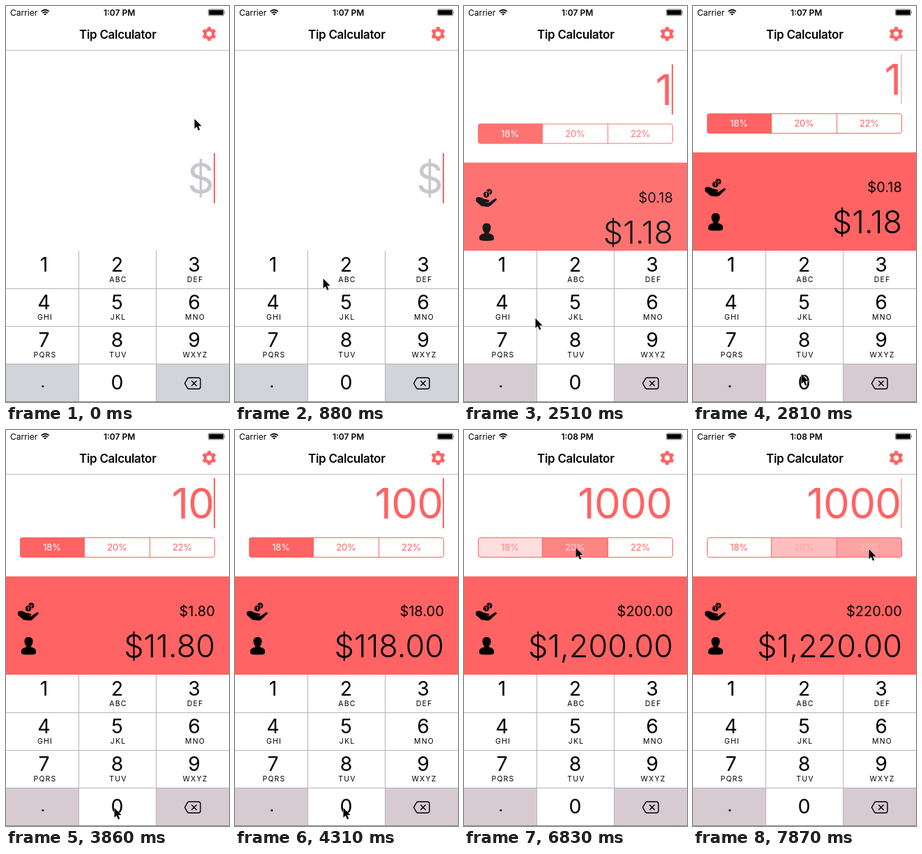
Animation of 320x568 px, one loop 8 s. Source, as an HTML page:

```html
<!DOCTYPE html>
<html lang="en">
<head>
<meta charset="utf-8">
<title>Tip Calculator</title>
<style>
html, body { margin: 0; width: 100%; height: 100%; overflow: hidden; background: #fff; }
svg { display: block; width: 100%; height: 100%; }
text { font-family: Inter, Roboto, sans-serif; }
.end { text-anchor: end; }
.mid { text-anchor: middle; }
#amount, #hint { font-size: 60px; letter-spacing: -.7px; }
#tip { font-size: 20px; }
#total { font-size: 45px; font-weight: 300; }
.digit { font-size: 28.5px; }
.sub { font-size: 10.5px; letter-spacing: 1.2px; }
.seg { font-size: 13px; letter-spacing: -.2px; }
</style>
</head>
<body>
<svg viewBox="0 0 320 568">
  <g id="panel">
    <rect y="210" width="320" height="358" fill="#ff6363"/>
    <path d="M17 261l3-1.5q5-.5 8 2.500l7 1.500q2.500 1 .5 3H30l6 .8 8-5.500q3-1 3 1.500l-9 8.500q-2 1.800-5 1.500l-8-1-8-7z"/>
    <g stroke="#ff6363">
      <circle cx="36.200" cy="252" r="4.700"/>
      <circle cx="32" cy="256" r="4.700"/>
      <path d="M37 250v3M32.300 253.500v5M31 254.500h1.300" fill="none" stroke-width="1.200"/>
    </g>
    <path d="M32.500 297c4.300 0 6.300 3 6 6.800-.2 3-1.500 5-2.700 6.200v1.300c4 1.500 7.200 2.300 7.200 6v2.700q0 2.300-10.500 2.300T22 320v-2.700c0-3.700 3.200-4.500 7.200-6V310c-1.200-1.200-2.500-3.200-2.700-6.200-.3-3.800 1.700-6.800 6-6.800z"/>
    <text id="tip" class="end" x="299.800" y="267"></text>
    <text id="total" class="end" x="300" y="326"></text>
  </g>
  <g id="segs"></g>
  <g id="field">
    <text id="hint" class="end" x="298" y="127" fill="#c7c7cd">$</text>
    <text id="amount" class="end" x="298.500" y="127" fill="#ff6363"></text>
    <rect id="caret" x="298" y="69" width="2" height="72" fill="#ff6363"/>
  </g>
  <g id="keys"></g>
  <g id="bar">
    <path d="M0 63.500H320" stroke="#bdbdbd"/>
    <text x="6" y="13.500" font-size="12">Carrier</text>
    <path d="M50.700 7.900q5.500-4.800 11 0M52.700 10.100q3.500-3 7 0" fill="none" stroke="#000" stroke-width="1.700"/>
    <path d="M54.200 11.600q2-1.600 4 0l-2 2z"/>
    <text id="clock" class="mid" x="162.600" y="13.500" font-size="12" font-weight="600"></text>
    <rect x="290.250" y="4.750" width="22.500" height="9" rx="1.800" fill="none" stroke="#000" stroke-width=".5"/>
    <rect x="291.300" y="5.800" width="20.400" height="6.900" rx=".8"/>
    <path d="M313.500 7.800q1.500 1.500 0 3z"/>
    <text class="mid" x="160.300" y="47" font-size="17" font-weight="600" letter-spacing="-.3">Tip Calculator</text>
    <g id="gear" transform="translate(291.500 40)" fill="none" stroke="#ff6363">
      <circle r="5.700" stroke-width="4"/>
    </g>
  </g>
  <path id="cursor" d="M.5 1V15L3.700 12 6 17.500 8.300 16.500 6 11.200H10.600z" stroke="#fff" paint-order="stroke"/>
</svg>
<script>
const LOOP = 8000, STEP = 148.5, LEAD = 18;
const presses = [2200, 3390, 4130, 4880]; // digits 1, 0, 0, 0
const taps = [6750, 7805];                // 20%, then 22%
const moves = [                           // start, end, x, y
  [200, 1050, 108, 419], [1050, 1700, 51, 370], [2220, 2800, 155, 527], [2850, 3080, 155, 541],
  [5400, 5770, 194, 365], [5800, 6500, 160, 168], [6850, 7550, 252, 170]];

const $ = id => document.getElementById(id);
const set = (id, name, value) => $(id).setAttribute(name, value);
const ramp = (t, start, length) => Math.min(1, Math.max(0, (t - start) / length));
const ease = u => u * u * (3 - 2 * u);
const mix = (a, b, u) => a + (b - a) * u;
const money = v => "$" + v.toLocaleString("en-US", { minimumFractionDigits: 2, maximumFractionDigits: 2 });

function pointer(t) {
  let x = 270, y = 161;
  for (const [start, end, tx, ty] of moves) {
    const u = ease(ramp(t, start, end - start));
    x = mix(x, tx, u);
    y = mix(y, ty, u);
  }
  return `translate(${x} ${y})`;
}

// Blinks once a second, restarted by each key press.
function caret(t) {
  const since = [-300, ...presses].filter(p => p <= t).pop();
  const phase = (t - since) % 1000;
  return 1 - ramp(phase, 560, 70) + ramp(phase, 950, 50);
}

function buildKeys() {
  const labels = ["", "ABC", "DEF", "GHI", "JKL", "MNO", "PQRS", "TUV", "WXYZ"];
  const edges = [0, 104, 215, 320];
  let out = "";
  for (let i = 0; i < 12; i++) {
    const col = i % 3, row = Math.floor(i / 3), y = 351 + 54 * row, x = 53.5 + 108 * col - (col ? 1.5 : 0);
    const name = [1, 2, 3, 4, 5, 6, 7, 8, 9, "Dot", 0, "Back"][i];
    const cx = col === 0 ? 54.5 : col === 1 ? 159.5 : 270;
    out += `<rect id="key${name}" x="${edges[col]}" y="${y}" width="${edges[col + 1] - edges[col]}" height="55" fill="#fff"/>`;
    if (name >= 0) out += `<text class="digit mid" x="${cx}" y="${row > 2 ? 550 : y + 30}">${name}</text>`;
    if (labels[i]) out += `<text class="sub mid" x="${cx + 1.5}" y="${y + 45}">${labels[i]}</text>`;
  }
  $("keys").innerHTML = out +
    `<path d="M0 405.500H320M0 459.500H320M0 513.500H320M104.500 351V568M215.500 351V568" stroke="#b4b4b8"/>
     <path d="M0 567.500H320" stroke="#8c8c8c"/>
     <circle cx="52.800" cy="545.500" r="1.600"/>
     <path d="M262.500 533.300h13.500q3 0 3 3v10q0 3-3 3h-13.500q-1.200 0-2-1l-4-7 4-7q.8-1 2-1zM266.200 537.600l7.400 7.400M273.600 537.600l-7.400 7.400" fill="none" stroke="#000" stroke-width="1.400"/>`;
}

function buildSegs() {
  const edges = [20, 113, 206, 300];
  $("segs").innerHTML =
    `<clipPath id="round"><rect x="20" y="154" width="280" height="29" rx="4"/></clipPath><g clip-path="url(#round)">` +
    [18, 20, 22].map((p, i) =>
      `<rect id="bg${i}" x="${edges[i]}" y="154" width="${edges[i + 1] - edges[i]}" height="29" fill="#ff6363"/>
       <text id="pct${i}" class="seg mid" x="${66 + 93.5 * i}" y="173">${p}%</text>`).join("") +
    `</g><rect x="20.500" y="154.500" width="279" height="28" rx="3.500" fill="none" stroke="#ff6363"/>
     <path d="M112.500 154V183M206.500 154V183" stroke="#ff6363"/>`;
}

function buildGear() {
  for (let a = 0; a < 360; a += 60)
    $("gear").innerHTML += `<path d="M-2.600-6.500L-1.900-9.700H1.900L2.600-6.500z" fill="#ff6363" stroke-width=".8" transform="rotate(${a})"/>`;
}

function draw(t) {
  set("cursor", "transform", pointer(t));
  set("caret", "opacity", caret(t));

  const open = ease(ramp(t, 2170, 420));
  for (const id of ["field", "segs", "panel"]) set(id, "transform", `translate(0 ${142 * (1 - open)})`);
  for (const id of ["segs", "panel"]) set(id, "opacity", open);
  const gray = `rgb(${mix(210, 216, open)},${mix(212, 202, open)},${mix(218, 209, open)})`;
  for (const id of ["keyDot", "keyBack"]) set(id, "fill", gray);

  const digits = presses.filter(p => p <= t).length;
  const bill = digits ? 10 ** (digits - 1) : 0;
  const rate = 18 + 2 * taps.filter(p => p <= t).length;
  set("hint", "opacity", bill ? 0 : 1);
  $("amount").textContent = bill || "";
  $("tip").textContent = money(bill * rate / 100);
  $("total").textContent = money(bill * (100 + rate) / 100);
  $("clock").textContent = t < 5640 ? "1:07 PM" : "1:08 PM";

  const [b, c] = taps.map(tap => ramp(t, tap, 80));
  [1 - b, b * (1 - c), c].forEach((on, i) => {
    const tone = mix(99, 255, on);
    set("bg" + i, "opacity", on);
    set("pct" + i, "fill", `rgb(255,${tone},${tone})`);
  });

  const press = (id, start) => set(id, "fill", t >= start && t < start + 150 ? "#d2d4da" : "#fff");
  press("key1", presses[0]);
  press("key0", presses[2]);
}

buildKeys();
buildSegs();
buildGear();

const origin = performance.now();
function loop() {
  const now = (performance.now() - origin) % LOOP;
  draw(Math.max(0, Math.floor((now + LEAD) / STEP) * STEP - LEAD));
  requestAnimationFrame(loop);
}
loop();
</script>
</body>
</html>
```
